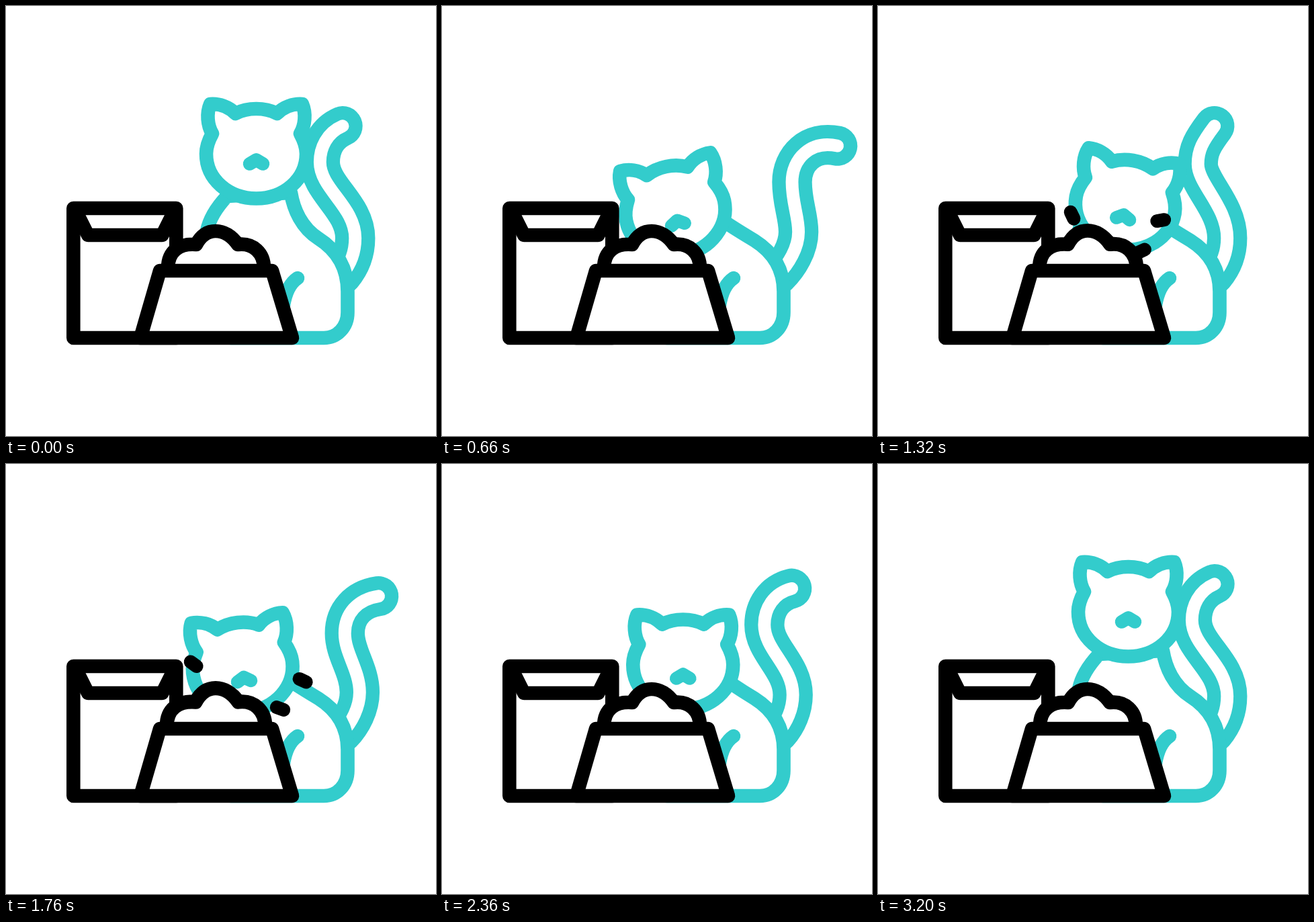
An HTML page with a canvas that plays this animation: 640x640 px, repeating every 3.6 s.

```html
<!DOCTYPE html>
<html lang="en">
<head>
<meta charset="utf-8">
<title>Cat eating</title>
<style>
html, body { margin: 0; width: 100%; height: 100%; overflow: hidden; background: #fff; }
canvas { display: block; width: 100vmin; height: 100vmin; }
</style>
</head>
<body>
<canvas id="stage" width="640" height="640"></canvas>
<script>
const ctx = document.getElementById('stage').getContext('2d');
const LOOP = 3600, STROKE = 20.6, TEAL = '#33cccc', BLACK = '#000', WHITE = '#fff';
ctx.lineCap = ctx.lineJoin = 'round';

const leftFace = 'M0-66C-11-66-21-64-31-59C-41-69-55-74-68.5-73C-74.5-59-72.5-41-65.5-29' +
  'C-71-19-74.5-10-74.5 1C-74.5 39-41 67.5 0 67.5';
const face = new Path2D(leftFace);
face.addPath(new Path2D(leftFace), new DOMMatrix([-1, 0, 0, 1, 0, 0]));
const nose = new Path2D('M-10 16L0 10L10 16');
const leg = new Path2D('M434 405C422 413 416 427 413 445');
const pack = new Path2D('M100.3 301H253.3V494H100.3Z');
const flap = new Path2D('M104 305L122 341H232.5L250.5 305');
const food = new Path2D(`M241 390C241 365 258 353 283 355C290 342 300 335 312 335
  C324 335 336 342 345 355C368 352 384 368 384 390`);
const bowl = new Path2D('M229 394H396L426 494H200Z');

const mix = (a, b, k) => a + (b - a) * k;
const clamp = k => Math.max(0, Math.min(1, k));
const ramp = (t, from, to) => (1 - Math.cos(Math.PI * clamp((t - from) / (to - from)))) / 2;

// Eases through [time, value] points.
const track = (t, points) => points.reduce((value, [time, next], i) =>
  i ? mix(value, next, ramp(t, points[i - 1][0], time)) : next, 0);

const tilt = t => track(t, [[0, 0], [600, -12], [1300, 10], [1750, -6.5], [2100, 3.7], [2320, 0]]);
const sway = t => track(t, [[0, 0.124], [848, 1], [1460, 0], [1922, 0.82], [2580, 0.124]]);
const curl = t => track(t, [[0, 1], [848, 0], [1922, 0], [2580, 1]]);
const dip = t => track(t, [[0, 0], [600, 1], [2280, 1], [3200, 0]]);

function line(path, color, width = STROKE) {
  ctx.strokeStyle = color;
  ctx.lineWidth = width;
  ctx.stroke(path);
}

function shape(path, color) {
  ctx.fillStyle = WHITE;
  ctx.fill(path);
  line(path, color);
}

// The tip swings out with s; c bends the middle back towards the head.
function drawTail(s, c) {
  const tipX = 487 + 113 * s, tipY = 174 + 38 * s;
  const bendX = 469 + 59 * s - 9 * c, bendY = 231 + 35 * s - 3 * c;
  const hipX = 518 + 14 * s, hipY = 347 - 12 * s;
  const spine = new Path2D();
  spine.moveTo(tipX, tipY);
  spine.bezierCurveTo(tipX - 14 - 29 * s - 6 * c, tipY + 28 - 39 * s - 13 * c,
    bendX, bendY - 19 - 17 * s, bendX, bendY);
  spine.bezierCurveTo(bendX, bendY + 30 + 10 * c, hipX, hipY - 51 + 30 * s, hipX, hipY);
  spine.bezierCurveTo(hipX, hipY + 20 + 4 * s, 512 + 4 * s, 385, 500, 400);
  line(spine, TEAL, 59.4);
  line(spine, WHITE, 18.8);
}

// The neck and shoulder sink as the head lowers.
function drawBody(sink) {
  const m = (a, b) => mix(a, b, sink);
  const body = new Path2D('M299 335C303 315 315 298 329 283');
  body.lineTo(m(424, 405), m(278, 310));
  body.bezierCurveTo(m(428, 415), m(303, 318), m(440, 445), m(330, 337), 465, m(346, 349));
  body.bezierCurveTo(492, m(363, 366), 508.5, 390, 508.5, 425);
  body.lineTo(508.5, 456);
  body.bezierCurveTo(508.5, 478, 493, 494, 473, 494);
  body.lineTo(335, 494);
  shape(body, TEAL);
  line(leg, TEAL);
}

function drawHead(angle, low) {
  ctx.save();
  ctx.translate(372.5 - 14 * low + angle, 219 + 80 * low - 0.4 * angle);
  ctx.rotate(angle * Math.PI / 180);
  shape(face, TEAL);
  ctx.translate(0, 6 * low ** 4);
  line(nose, TEAL, 19.6);
  ctx.restore();
}

// Crumbs fly on ballistic arcs, each a short dash along its path.
function drawCrumbs(t) {
  if (t <= 1050 || t >= 1980) return;
  const u = 0.6 * Math.sqrt((t - 1050) / 710);
  const size = clamp((t - 1050) / 80) * clamp((1980 - t) / 100);
  for (const [x, y, vx, vy] of [[305, 362, -43, -182], [387, 342, 91, -108], [366, 394, 70, -125]]) {
    const cx = x + vx * u, cy = y + vy * u + 125 * u * u;
    const angle = Math.atan2(vy + 250 * u, vx);
    const dx = 5.5 * size * Math.cos(angle), dy = 5.5 * size * Math.sin(angle);
    line(new Path2D(`M${cx - dx} ${cy - dy}L${cx + dx} ${cy + dy}`), BLACK, 20 * size);
  }
}

function drawFood(t) {
  const size = 1 + 0.025 * Math.sin(Math.PI * clamp((t - 1150) / 1200));
  ctx.save();
  ctx.translate(312.5, 390);
  ctx.scale(size, size);
  ctx.translate(-312.5, -390);
  shape(food, BLACK);
  ctx.restore();
}

function draw(t) {
  ctx.fillStyle = WHITE;
  ctx.fillRect(0, 0, 640, 640);
  drawTail(sway(t), curl(t));
  drawBody(dip(t) ** 2);
  drawHead(tilt(t), dip(t));
  shape(pack, BLACK);
  line(flap, BLACK);
  drawCrumbs(t);
  drawFood(t);
  shape(bowl, BLACK);
}

const start = performance.now();
function tick() {
  draw((performance.now() - start) % LOOP);
  requestAnimationFrame(tick);
}
tick();
</script>
</body>
</html>
```
